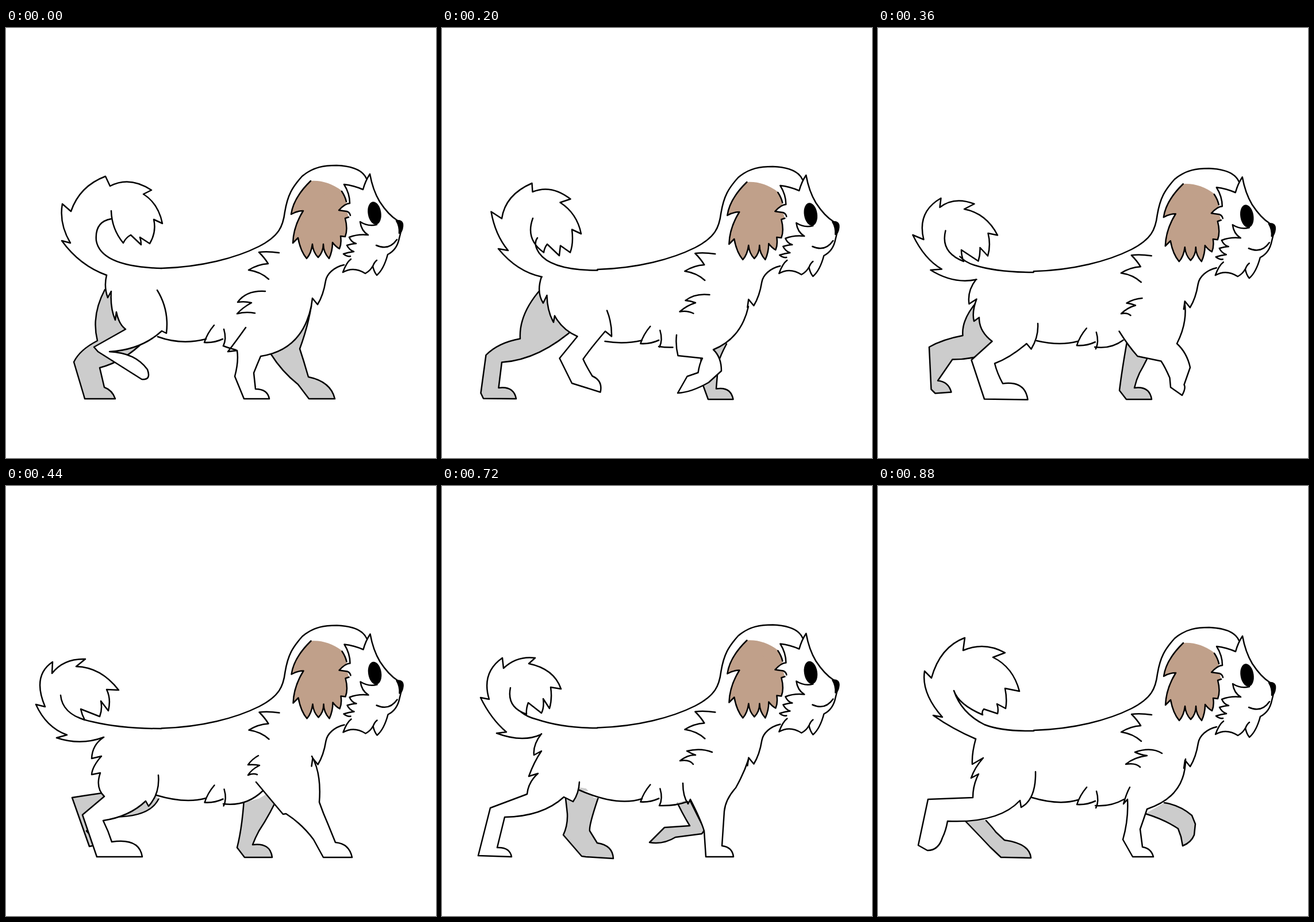
Write an HTML page that moves like this. It is 748 by 748 pixels and loops after 920 ms.

```html
<!DOCTYPE html>
<html lang="en">
<head>
<meta charset="utf-8">
<title>Walking dog</title>
<style>
  html, body { margin: 0; width: 100%; height: 100%; overflow: hidden; background: #fff; }
  svg { display: block; width: 748px; height: 748px; }
  path { fill: #fff; stroke: #000; stroke-width: 2.5; stroke-linejoin: round; stroke-linecap: round; }
  .far { fill: #ccc; }
  .line { fill: none; }
  .flat { stroke: none; }
  .ear { fill: #c0a08a; }
  .ink { fill: #000; }
</style>
</head>
<body>
<svg viewBox="0 0 748 748">
  <path id="farHind" class="far"/>
  <path id="farFront" class="far"/>
  <path id="tail"/>
  <path id="torso" class="flat" d="M184 444L270 426Q380 420 440 388C475 362 482 345 485 320C490 290 498 277 515 258L627 262L688 340L645 400L588 412Q556 420 556 440Q552 465 542 481L531 484L440 540L392 553L378 553L348 542L264 540Z"/>
  <path id="hind"/>
  <path id="front"/>
  <path id="shoulder" class="line"/>
  <g id="body">
    <path class="line" d="M270 418C340 416 400 400 440 380C475 362 482 345 485 320C490 290 498 277 515 258C535 241 555 239 575 239C600 240 620 246 627 262"/>
    <path class="ear flat" d="M530 266Q558 264 584 283Q591 294 592 305L579 318L593 319L596 329L540 350Z"/>
    <path class="ear" d="M596 329L590 331Q595 350 590 363L582 362Q584 375 580 384Q573 380 568 373Q568 388 562 401Q552 390 552 376Q552 390 543 399Q534 390 533 376Q531 392 523 401Q512 388 508 365L499 374Q500 345 517 318Q506 318 496 324Q500 295 530 266"/>
    <path class="line" d="M584 284Q590 293 592 302M593 319L579 317Q590 305 598 305Q598 288 588 272Q605 274 621 281Q625 266 633 254Q638 282 650 302Q665 325 681 335M593 319Q598 321 599 326"/>
    <path class="line" d="M645 342Q630 346 616 337Q618 353 630 360Q612 358 597 364Q601 373 609 375Q603 375 593 378Q597 386 605 389Q596 390 587 393Q593 398 599 397"/>
    <path class="line" d="M600 402Q592 408 586 425Q605 414 625 427Q634 422 638 414Q640 424 645 430Q657 420 664 394Q680 386 684 366L687 354M645 404Q640 408 638 415"/>
    <path class="line" d="M644 378Q666 388 680 368"/>
    <path class="ink" d="M679 335Q691 334 690 345Q689 355 684 357Q685 345 679 335Z"/>
    <ellipse cx="641" cy="322" rx="11.5" ry="20" transform="rotate(-9 641 322)"/>
    <path class="line" d="M588 412C570 416 558 428 556 440Q552 465 542 481Q537 475 533 470L531 484"/>
    <path class="line" d="M475 391Q455 388 440 390Q450 400 456 410Q438 411 422 421Q443 424 457 437"/>
    <path class="line" d="M362 517Q350 531 345 547Q362 548 377 541M379 524Q384 541 378 553"/>
  </g>
</svg>
<script>
const STEP = 40, STEPS = 23;
const times = [0, 120, 280, 440, 560, 720, 880];
const bob = [0, -3, 7, 3.5, -4, 2.5, 7];
const poses = {};
const pose = (part, d) => (poses[part] ??= []).push(d);

pose('tail', 'M175 430Q128 413 97 370L112 374Q92 340 98 306L113 319Q128 275 173 258L181 275Q215 257 253 282L239 289Q265 305 272 340L257 333Q262 355 250 375L233 364Q235 370 235 377L217 360Q208 365 204 374Q184 350 183 318M183 332Q154 337 157 370Q165 415 270 418');
pose('tail', 'M175 428Q128 408 101 364L114 368Q93 335 102 299L117 311Q130 270 175 254L180 272Q215 258 250 284L233 291Q258 315 264 350L244 341Q248 365 242 379L222 367Q222 374 222 382L206 368Q198 370 193 376Q171 350 176 321M172 337Q148 343 153 368Q165 415 270 415');
pose('tail', 'M173 438Q133 440 95 404L116 406Q92 385 69 340L91 352Q90 310 138 286L135 298Q165 285 197 311L178 316Q212 330 220 366L208 360Q210 385 204 402L190 390Q188 400 186 410L160 384Q158 395 161 405Q118 385 140 341M160 393Q168 408 185 415Q215 428 271 428');
pose('tail', 'M170 437Q130 452 88 438L106 433Q70 420 52 380L68 384Q45 330 81 306L80 326Q100 300 138 301L122 314Q165 315 196 355L175 354Q183 370 178 391L165 374Q168 388 163 401L130 388Q132 398 137 407Q98 395 95 364M125 402Q135 407 150 410Q200 422 270 422');
pose('tail', 'M171 428Q140 445 97 435L116 430Q85 415 67 378L83 381Q62 330 94 300L95 320Q115 295 147 292L137 305Q175 310 201 346L182 346Q188 370 183 390L173 376Q177 385 172 393L148 380Q144 390 146 400Q113 390 113 361M135 397Q145 402 160 404Q210 414 270 414');
pose('tail', 'M173 432Q140 447 95 430L112 428Q85 405 67 368L82 371Q68 325 105 299L107 317Q130 295 162 299L151 309Q195 318 207 353L189 350Q192 370 187 387L176 370Q178 385 173 395L150 377Q146 388 147 397Q112 385 119 351M136 392Q148 402 165 406Q210 421 270 421');
pose('tail', 'M170 440Q130 423 96 399L112 402Q75 360 81 322L93 334Q108 280 151 264L148 286Q185 270 221 290L200 298Q235 315 246 357L221 352Q225 372 222 387L207 379Q210 388 208 396L184 388Q180 393 182 398Q140 380 132 356M132 356Q145 395 185 415Q215 427 271 426');

pose('hind', 'M175 430Q170 450 177 469L183 458Q181 487 190 508L192 494Q196 515 208 524L153 555L160 563L236 611Q253 613 246 594Q225 565 180 563Q235 560 271 527L279 531Q284 490 263 456M264 537Q305 552 348 541');
pose('hind', 'M175 428Q168 455 184 471L188 457Q190 485 203 506L204 493Q222 520 245 523L217 566L240 590L267 619Q280 612 273 593Q265 575 254 567Q270 545 294 505L305 513Q300 485 283 458M277 540Q312 547 348 540');
pose('hind', 'M171 438Q160 465 168 486L177 473Q176 500 185 518L188 508Q196 530 226 550L192 583L212 646L284 648Q280 615 250 618Q236 600 237 585Q245 572 274 550L285 560Q291 540 291 525M290 550Q320 554 347 547');
pose('hind', 'M170 437Q150 450 149 474L166 470Q150 488 149 502L164 499Q155 525 171 540L133 572L158 645L237 645Q232 612 184 619Q178 600 169 582Q215 575 243 548L248 557Q268 535 265 503M262 538Q312 553 348 543');
pose('hind', 'M172 428Q155 445 151 476L162 463Q155 490 150 513L158 505Q155 527 160 547L118 582L135 645L208 645Q205 615 168 614Q165 605 161 589Q215 582 240 545L241 555Q266 525 263 496M258 531Q300 547 348 537');
pose('hind', 'M173 431Q158 450 160 468L173 461Q160 480 151 505L167 500Q150 515 148 536L84 560L63 643L121 645Q118 628 96 629Q103 600 109 576Q175 575 212 541L228 549Q238 535 239 515M239 529Q305 558 348 544');
pose('hind', 'M170 440Q163 465 164 484L183 473Q168 490 162 508L175 501Q165 520 165 542L87 545L70 625L86 634Q105 634 112 612Q118 600 121 583Q210 587 247 547L249 559Q275 545 274 497M268 542Q315 556 348 546');

pose('front', 'M531 484Q515 560 443 571Q437 585 431 600L434 628Q455 628 458 645L414 645L398 606Q405 580 402 561L386 563Q400 545 417 521M378 553Q385 556 400 560');
pose('front', 'M531 482Q513 555 449 571Q449 585 446 600L436 612Q392 638 364 638L387 608L411 597Q412 575 408 560L400 569Q402 545 412 528M378 551Q386 552 397 555');
pose('front', 'M535 487Q528 525 495 548Q523 560 526 593L492 621Q475 630 456 632L466 604L480 602Q484 592 498 589L421 571Q410 560 404 540M376 557Q392 560 406 556');
pose('front', 'M532 470Q549 500 545 550Q552 570 560 588L573 620Q597 622 602 646L552 646L535 615Q515 588 487 570L482 571Q460 545 435 515M378 553Q418 558 447 530');
pose('front', 'M531 482Q527 515 511 558Q514 571 518 585L525 608Q565 618 572 645L527 645L508 621Q470 585 447 548L439 553Q434 540 430 525M378 549Q405 553 433 538');
pose('front', 'M533 476Q525 500 511 525Q493 545 491 566L487 626Q505 628 507 645L459 645L456 600Q450 580 432 545L428 553Q419 540 419 517M378 556Q405 557 427 549');
pose('front', 'M535 475Q535 540 468 562Q462 580 456 597L460 628Q475 630 479 645L443 645L426 615Q436 580 434 545L427 553Q432 535 438 524M378 556Q405 558 428 545');

pose('farHind', 'M172 455Q148 500 159 544Q128 560 118 581L135 638L137 645L190 645Q185 630 171 625L163 591Q205 580 240 545');
pose('farHind', 'M173 455Q147 505 145 545Q110 550 90 570L95 640L95 644L160 645Q155 625 129 625L121 585Q205 580 245 510');
pose('farHind', 'M172 452Q120 490 127 536Q85 545 63 568L40 630L49 645L98 645Q95 620 68 627L87 578Q135 575 225 527');
pose('farHind', 'M172 500Q170 525 168 534Q140 538 115 542L145 627L150 626L157 622Q150 610 140 600L172 575Q255 580 268 538');
pose('farHind', 'M180 480Q175 520 180 545Q185 565 194 583L235 603L243 607L250 602Q254 588 247 584L218 570Q235 540 250 520');
pose('farHind', 'M212 520Q216 550 218 570Q219 590 211 607L243 644L250 645L298 648Q297 625 270 621L257 600Q255 590 276 530');
pose('farHind', 'M150 560Q150 575 153 584Q180 612 195 628L214 646L220 646L266 647Q264 622 220 616L205 602Q200 595 188 582');

pose('farFront', 'M531 484Q525 520 511 558L518 580L526 607Q565 615 572 645L527 645L508 620Q480 598 460 566');
pose('farFront', 'M510 525Q495 550 491 566L492 595L491 627Q520 622 524 646L477 646L468 605Q462 585 452 570');
pose('farFront', 'M480 574Q473 590 470 600L466 612L463 628Q485 625 489 646L449 646L438 632Q436 605 450 570');
pose('farFront', 'M478 530Q460 570 440 600L434 612L429 624Q460 620 463 646L415 646L402 629Q412 590 415 528');
pose('farFront', 'M450 528Q448 565 437 590L431 600L434 627Q455 627 458 645L414 645L399 605Q404 580 403 530');
pose('farFront', 'M428 540Q444 573 457 598L452 605L406 611Q385 624 361 620L387 594L431 591Q418 570 404 540');
pose('farFront', 'M498 551Q525 555 546 573L552 588L550 607Q545 620 530 626L527 610L522 596Q498 580 465 570');

pose('shoulder', 'M451 458Q418 456 403 477Q415 475 427 478Q412 486 402 497Q417 493 433 496');
pose('shoulder', 'M451 457Q418 455 403 476Q415 474 427 477Q412 485 402 496Q417 492 433 495');
pose('shoulder', 'M480 471Q462 467 444 472Q450 475 455 479Q440 480 425 491Q436 490 442 498');
pose('shoulder', 'M439 469Q428 475 421 485Q431 484 441 486Q427 493 421 503Q430 499 437 502');
pose('shoulder', 'M415 461Q400 473 391 491Q407 486 424 488Q411 498 406 513Q420 505 436 508');
pose('shoulder', 'M470 463Q450 455 426 461Q433 465 441 468Q428 467 414 478Q430 475 437 484');
pose('shoulder', 'M494 465Q475 453 447 463Q458 468 468 469Q445 472 431 484Q448 481 456 489');

const byId = id => document.getElementById(id);
const lerp = (a, b, k) => a + (b - a) * k;

function morph(from, to, k) {
  const target = to.match(/[\d.]+/g);
  let i = 0;
  return from.replace(/[\d.]+/g, n => lerp(+n, +target[i++], k).toFixed(2));
}

function draw(now) {
  const t = Math.floor(now / STEP) % STEPS * STEP;
  let i = 0;
  while (i < times.length - 2 && t >= times[i + 1]) i++;
  const k = (t - times[i]) / (times[i + 1] - times[i]);
  for (const part in poses) {
    byId(part).setAttribute('d', morph(poses[part][i], poses[part][i + 1], k));
  }
  const y = lerp(bob[i], bob[i + 1], k);
  const shift = `translate(${y * 0.15} ${y})`;
  byId('torso').setAttribute('transform', shift);
  byId('body').setAttribute('transform', shift);
}

const start = performance.now();
function loop() {
  draw(performance.now() - start);
  requestAnimationFrame(loop);
}
loop();
</script>
</body>
</html>
```
